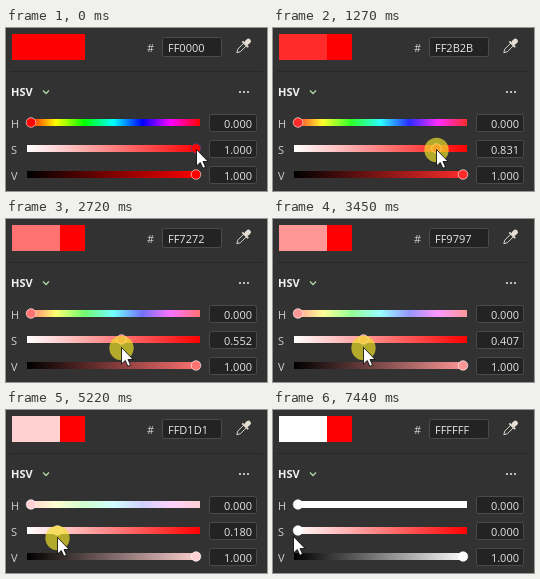
Recreate the animation shown at these times as an HTML page. Size 261 by 163 pixels, loop 7.51 s.

```html
<!DOCTYPE html>
<html lang="en">
<head>
<meta charset="utf-8">
<title>HSV picker</title>
<style>
  html, body { margin: 0; width: 100%; height: 100%; overflow: hidden; background: #323232; }
  svg { display: block; width: 100vw; height: 100vh; }
  text { font: 11px "Open Sans", "Noto Sans", sans-serif; fill: #e6e6e6; }
  .label { fill: #cfcfcf; }
  .title { font-weight: 700; fill: #f2f2f2; }
  .field { fill: #232323; stroke: #4b4b4b; }
  .num { text-anchor: end; }
  .knob { stroke: #fff; stroke-opacity: .6; }
</style>
</head>
<body>
<svg viewBox="0 0 261 163">
  <defs>
    <linearGradient id="gH"></linearGradient>
    <linearGradient id="gS"><stop stop-color="#fff"/><stop offset="1" stop-color="#f00"/></linearGradient>
    <linearGradient id="gV"><stop stop-color="#000"/><stop id="vEnd" offset="1"/></linearGradient>
  </defs>
  <rect width="261" height="163" fill="#323232"/>
  <rect x="6" y="6" width="73" height="26" fill="#f00"/>
  <rect id="swatch" x="6" y="6" width="48" height="26"/>
  <text x="141" y="24" class="label">#</text>
  <rect class="field" x="156.5" y="9.5" width="59" height="19" rx="2"/>
  <text id="hex" x="162" y="23.5"></text>
  <g transform="translate(237 18.5) rotate(45) scale(.92)">
    <path d="M-2 -3V6L0 9.5L2 6V-3" fill="none" stroke="#d5ddd0"/>
    <path d="M-4.5 -4.5H4.5V-2.5H-4.5Z" fill="#e6ddd2"/>
    <rect x="-2.7" y="-11" width="5.4" height="7.5" rx="2.5" fill="#e6ddd2"/>
  </g>
  <path d="M4 43.5H257" stroke="#282828"/>
  <text x="5" y="68" class="title">HSV</text>
  <path d="M37 62.5L40 65.5L43 62.5" fill="none" stroke="#b0d8a4" stroke-width="1.3"/>
  <path d="M234 64H243" stroke="#ddd" stroke-width="2.2" stroke-linecap="round" stroke-dasharray="0 4"/>
  <g id="rows"></g>
  <circle id="halo" r="12.2" fill="#f0e128" fill-opacity=".68"/>
  <path id="cursor" d="M0 0V16.5L3.8 13L6.4 18.8L9 17.6L6.5 12H11.6Z" fill="#fff" stroke="#000" stroke-width=".8"/>
</svg>
<script>
const LOOP = 7510, DRAG = 530, RELEASE = 7440, STEP = 73;
const RANGE = 172;                      // slider travel in pixels
const $ = id => document.getElementById(id);
const set = (id, attrs) => { for (const k in attrs) $(id).setAttribute(k, attrs[k]); };
const clamp = (v, lo, hi) => Math.max(lo, Math.min(hi, v));

$('rows').innerHTML = ['H', 'S', 'V'].map((c, i) => {
  const y = 94.5 + 26 * i, max = c === 'V';
  return `<text class="label" x="5" y="${y + 5}">${c}</text>
    <rect x="21" y="${y - 3.5}" width="173" height="7" fill="url(#g${c})"/>
    <circle class="knob" id="k${c}" cx="${max ? 190 : 25}" cy="${y}" r="4.8"/>
    <rect class="field" x="203.5" y="${y - 8}" width="47" height="17" rx="2"/>
    <text class="num" id="n${c}" x="246" y="${y + 5}">${max ? '1.000' : '0.000'}</text>`;
}).join('');
$('gH').innerHTML = [0, 1, 2, 3, 4, 5, 6].map(i => `<stop offset="${i / 6}"/>`).join('');

const stepAt = t => Math.max(0, Math.floor((t - DRAG) / STEP) + 1);

// Turning points of the drag: time, slider pixel, pointer height
const keys = [
  [0, RANGE, 121.5], [1270, 143, 121.5], [2720, 95, 128.5], [4140, 48, 128.5],
  [5220, 31, 127.5], [6560, 12, 126.5], [7110, 0, 126.5]
].map(([t, px, y]) => ({ at: stepAt(t), px, y }));

function poseAt(t) {
  const n = Math.min(stepAt(t), keys.at(-1).at);
  const i = Math.max(1, keys.findIndex(k => k.at >= n));
  const a = keys[i - 1], b = keys[i], f = (n - a.at) / (b.at - a.at);
  return { px: Math.round(a.px + (b.px - a.px) * f), y: a.y + (b.y - a.y) * f };
}

const hsv = (h, s) => 'rgb(' + [5, 3, 1].map(n => {
  const k = (n + h) % 6;
  return Math.round(255 * (1 - s * clamp(Math.min(k, 4 - k), 0, 1)));
}) + ')';

function draw(t) {
  const { px, y } = poseAt(t);
  const s = px / RANGE, x = Math.min(20.5 + px, 190.5);
  const low = Math.round(255 * (1 - s)).toString(16).toUpperCase().padStart(2, '0');
  const color = '#FF' + low + low;
  set('swatch', { fill: color });
  set('vEnd', { 'stop-color': color });
  [...$('gH').children].forEach((stop, i) => stop.setAttribute('stop-color', hsv(i, s)));
  for (const c of 'HSV') set('k' + c, { fill: color });
  set('kS', { cx: clamp(x, 25, 190), style: t < DRAG ? 'stroke:#2456b8' : '' });
  $('hex').textContent = color.slice(1);
  $('nS').textContent = s.toFixed(3);
  set('halo', { cx: x, cy: y + .5, visibility: t >= DRAG && t < RELEASE ? 'visible' : 'hidden' });
  set('cursor', { transform: `translate(${x} ${y})` });
}

function tick() {
  draw(performance.now() % LOOP);
  requestAnimationFrame(tick);
}
tick();
</script>
</body>
</html>
```
